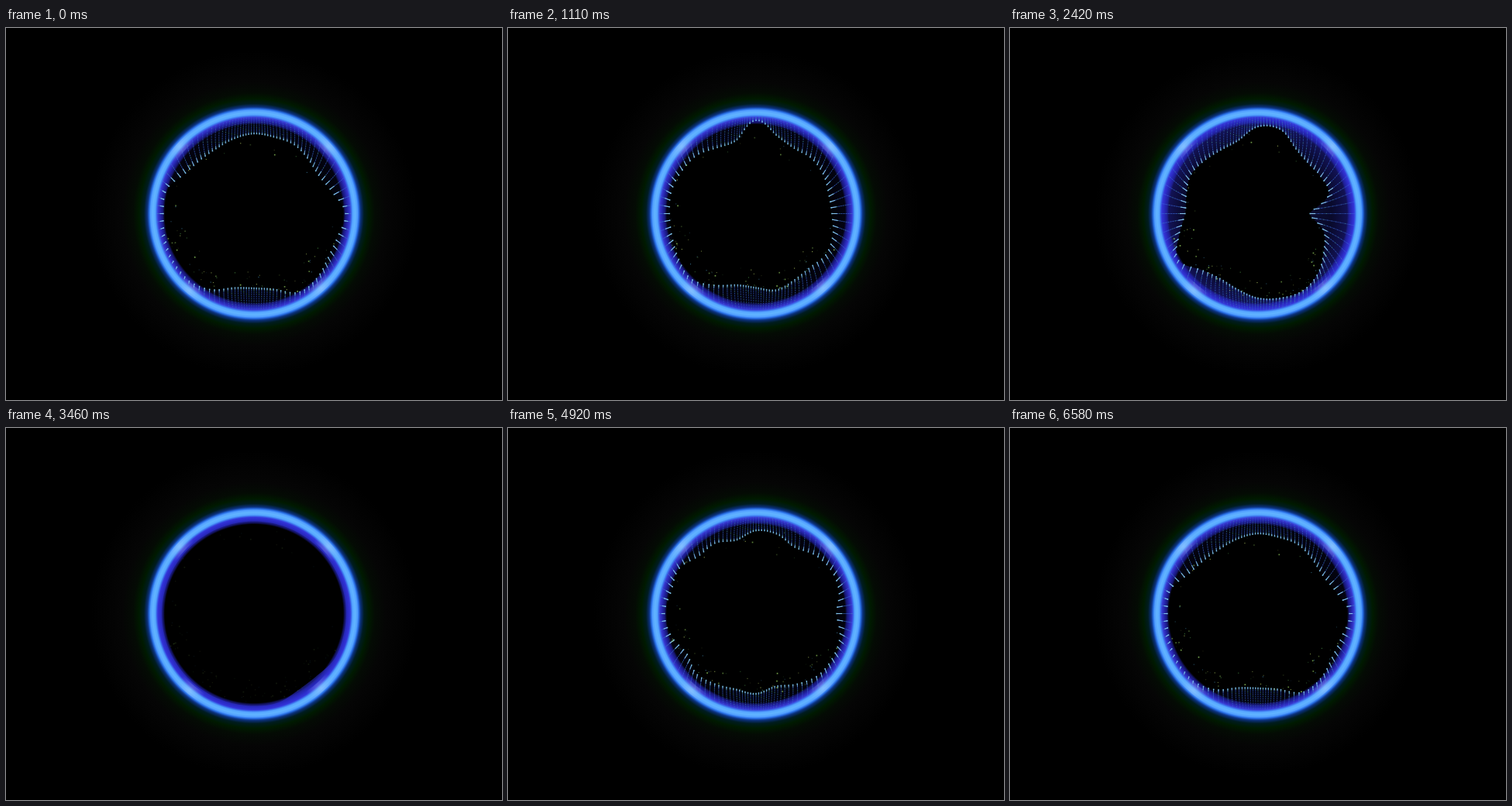
An HTML page with a canvas for the animation above (6.65 s loop, 640 px wide and 480 px high).

```html
<!DOCTYPE html>
<html lang="en">
<head>
<meta charset="utf-8">
<title>Energy ring</title>
<style>
html, body { margin: 0; width: 100%; height: 100%; overflow: hidden; background: #000; }
canvas { display: block; }
</style>
</head>
<body>
<canvas id="stage" width="640" height="480"></canvas>
<script>
const ctx = document.getElementById('stage').getContext('2d');
const TAU = Math.PI * 2, LOOP = 6650, STEP = 70, RIM = 126;
const { sin, cos, floor, min, max, hypot } = Math;

// Inner edge of the membrane, one radius per 15 degrees, clockwise from the right.
const poses = [
  { t: 0, fill: .1, mesh: 1, r: [118,112,111,116,117,101,96,99,113,121,121,119,117,117,103,98,97,100,103,102,103,99,97,105] },
  { t: 1110, fill: .1, mesh: 1, r: [98,103,104,98,99,102,95,95,107,119,115,112,112,113,110,107,99,98,120,104,98,101,100,97] },
  { t: 2420, fill: .5, mesh: 1, r: [67,88,98,109,115,113,109,101,97,103,119,105,94,96,100,97,95,98,112,112,97,92,94,94] },
  { t: 3460, fill: .65, mesh: 0, r: Array.from({ length: 24 }, (_, i) => i === 3 || i === 4 ? 114 : 119) },
  { t: 4920, fill: .08, mesh: 1, r: [104,112,114,113,105,97,103,101,105,109,103,113,118,113,115,105,105,98,107,106,99,107,112,111] },
  { t: 5820, fill: .38, mesh: 1, r: [112,117,117,104,98,93,94,97,111,120,117,114,112,113,108,101,97,107,119,108,99,98,95,95] }
];
poses.push({ ...poses[0], t: LOOP - STEP });

const mix = (a, b, k) => a + (b - a) * k;
const rand = n => { const v = sin(n * 127.1 + 11.7) * 43758.5453; return v - floor(v); };

function poseAt(t) {
  let i = 0;
  while (i < poses.length - 2 && t >= poses[i + 1].t) i++;
  const a = poses[i], b = poses[i + 1];
  const p = min(1, (t - a.t) / (b.t - a.t)), k = p * p * (3 - 2 * p);
  const mesh = mix(a.mesh, b.mesh, k);
  const ripple = 2.5 * sin(p * Math.PI) * mesh;
  return {
    fill: mix(a.fill, b.fill, k),
    mesh: min(1, mesh * 1.6),
    r: a.r.map((v, n) => mix(v, b.r[n], k) + ripple * sin(n * 1.6 + t / 260))
  };
}

function edge(r, angle) {
  const n = r.length, x = ((angle / TAU) % 1 + 1) % 1 * n, i = floor(x), f = x - i;
  const [a, b, c, d] = [-1, 0, 1, 2].map(o => r[(i + o + n) % n]);
  const v = b + f / 2 * (c - a + f * (2 * a - 5 * b + 4 * c - d + f * (3 * (b - c) + d - a)));
  return min(v, 121);
}

function radial(from, to, stops) {
  const g = ctx.createRadialGradient(0, 0, from, 0, 0, to);
  for (const [at, color] of stops) g.addColorStop((at - from) / (to - from), color);
  return g;
}

function disc(r, style) {
  ctx.fillStyle = style;
  ctx.beginPath();
  ctx.arc(0, 0, r, 0, TAU);
  ctx.fill();
}

function dot(r, a, size, style) {
  ctx.fillStyle = style;
  ctx.fillRect(r * cos(a) - size / 2, r * sin(a) - size / 2, size, size);
}

const halo = radial(130, 210, [
  [130, '#2f7cff'], [135, '#2468d8'], [138, '#0a2f78'], [142, '#001c20'],
  [148, '#001a00'], [156, '#040b04'], [170, '#050505'], [210, '#000']
]);
const band = radial(115, 128, [
  [115, 'rgba(24,24,130,0)'], [117.5, 'rgba(28,28,145,.75)'],
  [121, '#2424a8'], [124, '#3939cf'], [128, '#397df0']
]);
const ring = radial(124, 137, [
  [124, 'rgba(60,90,230,0)'], [126, '#3f78ef'], [127.5, '#56a7ff'],
  [130.5, '#62b4ff'], [133.5, '#529fff'], [135.5, 'rgba(40,110,230,.7)'], [137, 'rgba(20,70,180,0)']
]);
const veil = radial(65, RIM, [
  [65, 'rgba(50,55,190,.55)'], [95, 'rgba(36,38,170,.5)'], [RIM, 'rgba(48,48,225,1)']
]);

function annulus(inner, outer, style) {
  ctx.fillStyle = style;
  ctx.beginPath();
  ctx.arc(0, 0, outer, 0, TAU);
  ctx.arc(0, 0, inner, TAU, 0, true);
  ctx.fill();
}

function drawVeil(pose) {
  ctx.beginPath();
  ctx.arc(0, 0, RIM, 0, TAU);
  for (let i = 0; i <= 180; i++) {
    const a = -i / 180 * TAU, r = edge(pose.r, a);
    ctx[i ? 'lineTo' : 'moveTo'](r * cos(a), r * sin(a));
  }
  ctx.globalAlpha = pose.fill;
  ctx.fillStyle = veil;
  ctx.fill();
}

function drawMesh(pose) {
  const strands = 112, rows = 11;
  for (let s = 0; s < strands; s++) {
    const base = s / strands * TAU, a = base + .2 * sin(2 * base);
    const inner = edge(pose.r, a), depth = RIM - inner;
    const side = cos(a) ** 2, twist = depth / 190 * sin(2 * a);
    const at = u => [inner + depth * u, a + twist * u];

    ctx.strokeStyle = '#3f72e0';
    ctx.lineWidth = .7;
    ctx.globalAlpha = pose.mesh * (.22 + .3 * side);
    ctx.beginPath();
    for (let u = 0; u <= 1; u += .25) {
      const [r, w] = at(u);
      ctx.lineTo(r * cos(w), r * sin(w));
    }
    ctx.stroke();

    for (let i = 0; i < rows; i++) {
      const u = (i / rows) ** 1.3, [r, w] = at(u);
      ctx.globalAlpha = pose.mesh * mix(.9, .4, u);
      dot(r, w, i ? 1 : 1.5, i < 2 ? '#79c5ee' : (s + i) % 5 ? '#3b66d8' : '#4aa58c');
    }

    // Bright tip, longest where the surface is seen side-on.
    const [r, w] = at(min(.5, (2 + 5 * side) / max(depth, 8)));
    ctx.globalAlpha = pose.mesh * (.45 + .5 * side);
    ctx.strokeStyle = '#8acaf0';
    ctx.lineWidth = 1.1;
    ctx.beginPath();
    ctx.moveTo(inner * cos(a), inner * sin(a));
    ctx.lineTo(r * cos(w), r * sin(w));
    ctx.stroke();
  }
}

function drawSparks(pose, t) {
  const phase = t / LOOP * TAU;
  for (let i = 0; i < 95; i++) {
    const low = i < 62;
    const a = low ? .35 + rand(i) * 2.5 : rand(i) * TAU;
    const drift = sin(phase * (1 + i % 3) + i);
    const r = min(edge(pose.r, a) + 4, 113) - 26 * rand(i + 200) ** 1.5 + 3 * drift;
    const glow = .5 + .5 * sin(phase * (2 + i % 4) + i * 2.4);
    ctx.globalAlpha = mix(.12, .15 + .65 * glow, pose.mesh);
    dot(r, a + .04 * drift, i % 4 ? 1.1 : 1.7, ['#8fc65b', '#4b9048', '#b4cb62', '#3d7da0'][i % 4]);
  }
}

function drawGlints() {
  for (const deg of [48, 130, 222, 318]) {
    const a = deg / 360 * TAU, x = 129 * cos(a), y = 129 * sin(a);
    const g = ctx.createRadialGradient(x, y, 0, x, y, 20);
    g.addColorStop(0, 'rgba(190,215,255,.38)');
    g.addColorStop(1, 'rgba(150,190,255,0)');
    annulus(121, 134, g);
  }
}

function draw(now) {
  const t = floor(now % LOOP / STEP) * STEP, pose = poseAt(t);
  ctx.setTransform(1, 0, 0, 1, 0, 0);
  ctx.globalAlpha = 1;
  ctx.fillStyle = '#000';
  ctx.fillRect(0, 0, 640, 480);
  ctx.translate(320, 239.5);
  disc(210, halo);
  disc(RIM + 1, '#000');
  annulus(115, 128, band);
  drawVeil(pose);
  drawMesh(pose);
  drawSparks(pose, t);
  ctx.globalAlpha = 1;
  annulus(124, 137, ring);
  drawGlints();
  requestAnimationFrame(() => draw(performance.now() - start));
}

const start = performance.now();
draw(0);
</script>
</body>
</html>
```
